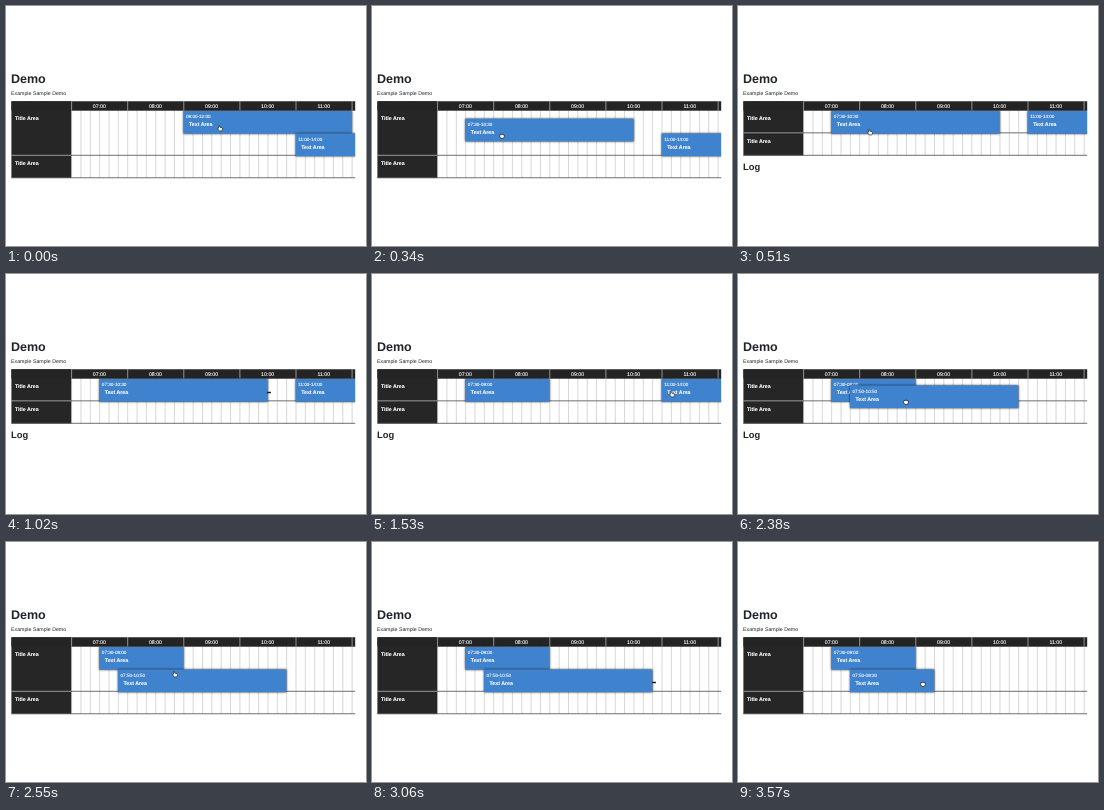
An HTML page that plays this animation: 360 px wide and 240 px high, repeating every 3.74 s.

```html
<!DOCTYPE html>
<html lang="en">
<head>
<meta charset="utf-8">
<title>Schedule demo</title>
<style>
html, body { margin: 0; width: 100%; height: 100%; overflow: hidden; background: #fff; }
svg { display: block; }
text { font: 5.25px "Liberation Sans", Arial, sans-serif; fill: #212529; text-rendering: geometricPrecision; }
.bold, .name { font-weight: 700; }
.white { fill: #fff; stroke: #fff; stroke-width: .12px; }
.hour { text-anchor: middle; }
.time { font-size: 4.6px; }
.bar rect { fill: #3f82cd; filter: drop-shadow(.5px .6px .8px rgba(0,0,0,.8)); }
.line { stroke: #606060; stroke-width: .9px; }
</style>
</head>
<body>
<svg width="360" height="240" viewBox="0 0 360 240">
  <clipPath id="frame"><rect x="5.4" y="95.3" width="343.8" height="78"/></clipPath>
  <text class="bold" x="5" y="77.4" style="font-size:12.5px">Demo</text>
  <text x="5" y="89.4">Example Sample Demo</text>
  <g clip-path="url(#frame)">
    <path id="grid" stroke="#bbb" stroke-width=".6"/>
    <rect id="side" x="5" y="95" width="60.3" fill="#262626"/>
    <rect x="5" y="95" width="345" height="9.7" fill="#242424"/>
    <g id="hours"></g>
    <path id="rowLines" class="line"/>
    <path id="rule" stroke="#ccc" stroke-width=".7"/>
    <text class="bold white" x="9" y="114.3">Title Area</text>
    <text class="bold white" x="9" id="title2">Title Area</text>
    <g class="bar" id="barA"></g>
    <g class="bar" id="barB"></g>
  </g>
  <text class="bold" id="log" x="5" y="164.3" style="font-size:9.4px">Log</text>
  <g id="cursor">
    <path id="hand" d="M-1.6-2.6Q-1-3.3-.5-2.6L-.2-.8 2-.3Q2.7 0 2.5 1L1.9 2.9H-.8L-2.5.6Q-2.5-.3-1.4.3Z" fill="#fff" stroke="#111" stroke-width=".6"/>
    <path id="fist" d="M-2.2-1.2Q0-2.4 2.2-1.2L2.3.6 1.6 2.4H-1.2L-2.4.6Z" fill="#fff" stroke="#111" stroke-width=".7"/>
    <path id="resize" d="M-2.1 0-.8-1.4V-.5H.8V-1.4L2.1 0 .8 1.4V.5H-.8V1.4Z" fill="#111"/>
  </g>
</svg>
<script>
const STEP = 170, COUNT = 22, MINUTE = 0.935;
const ROW = 22.45, HEAD_END = 104.7, TOP = 105, LOW = TOP + ROW;
const $ = id => document.getElementById(id);
const xAt = minute => 65.3 + (minute - 420) * MINUTE;
const clock = m => [Math.floor(m / 60), m % 60].map(n => String(n).padStart(2, "0")).join(":");

let gridPath = "";
for (let m = 420; m <= 720; m += 10) gridPath += `M${xAt(m) + .3} 104V172`;
$("grid").setAttribute("d", gridPath);

for (let m = 420; m <= 720; m += 60)
  $("hours").innerHTML += `<path d="M${xAt(m) + .3} 95V104.7" stroke="#ddd" stroke-width=".6"/>
    <text class="white hour" x="${xAt(m + 30)}" y="101.9">${clock(m)}</text>`;

for (const id of ["barA", "barB"])
  $(id).innerHTML = `<rect height="22.7"/><text class="time white" x="2.5" y="7.4"></text>
    <text class="name white" x="5.5" y="15.4">Text Area</text>`;

// Each change takes effect at its step and holds until overridden:
// a, b = [start, end, top]; c = [x, y, shape]
const changes = {
  0: { tall: true, a: [540, 720, TOP], b: [660, 840, LOW], c: [214, 122, "hand"] },
  1: { a: [500, 680, 108], c: [177, 125, "fist"] },
  2: { a: [450, 630, 112.7], c: [130, 130, "fist"] },
  3: { tall: false, a: [450, 630, TOP], b: [660, 840, TOP], c: [132, 126, "hand"] },
  4: { c: [185, 121, "hand"] },
  5: { c: [240, 119, "hand"] },
  6: { c: [263, 118.5, "resize"] },
  7: { a: [450, 590, TOP], c: [225, 118.5, "resize"] },
  8: { a: [450, 540, TOP], c: [179, 118.5, "resize"] },
  9: { c: [300, 120, "hand"] },
  10: { b: [650, 830, 107], c: [333, 124, "fist"] },
  11: { b: [570, 750, 117], c: [257, 134, "fist"] },
  12: { b: [490, 670, LOW], c: [183, 144, "fist"] },
  13: { b: [480, 660, 120], c: [176, 137, "fist"] },
  14: { b: [470, 650, 111.4], c: [168, 128, "fist"] },
  15: { tall: true, b: [470, 650, LOW], c: [169, 132, "hand"] },
  16: { c: [205, 138, "hand"] },
  17: { c: [255, 140, "hand"] },
  18: { c: [282, 140.5, "resize"] },
  19: { b: [470, 600, LOW], c: [234, 140.5, "resize"] },
  20: { b: [470, 560, LOW], c: [196, 141, "resize"] },
  21: { c: [185, 142, "fist"] }
};
const states = [];
for (let i = 0; i < COUNT; i++) states.push({ ...states[i - 1], ...changes[i] });

function move(el, x, y) {
  el.setAttribute("transform", `translate(${x} ${y})`);
}
function drawBar(el, [start, end, top]) {
  move(el, xAt(start), top);
  el.querySelector("rect").setAttribute("width", (end - start) * MINUTE);
  el.querySelector(".time").textContent = clock(start) + "-" + clock(end);
}
function draw({ tall, a, b, c }) {
  const split = HEAD_END + ROW * (tall ? 2 : 1), end = split + ROW;
  $("side").setAttribute("height", end - 95);
  $("grid").style.clipPath = `polygon(0 0, 360px 0, 360px ${end}px, 0 ${end}px)`;
  $("grid").setAttribute("d", gridPath.replaceAll("V172", "V" + end));
  $("rowLines").setAttribute("d", `M65 ${split - .3}H350M5 ${end - .3}H350`);
  $("rule").setAttribute("d", `M5 ${split - .3}H65`);
  $("title2").setAttribute("y", split + 9.6);
  $("log").style.display = tall ? "none" : "inline";
  drawBar($("barA"), a);
  drawBar($("barB"), b);
  move($("cursor"), c[0], c[1]);
  for (const shape of ["hand", "fist", "resize"])
    $(shape).style.display = shape === c[2] ? "inline" : "none";
}
$("grid").style.clipPath = "none";

let shown = -1;
const origin = performance.now();
function tick() {
  const step = Math.floor(Math.max(0, performance.now() - origin) / STEP) % COUNT;
  if (step !== shown) draw(states[shown = step]);
  requestAnimationFrame(tick);
}
tick();
</script>
</body>
</html>
```
